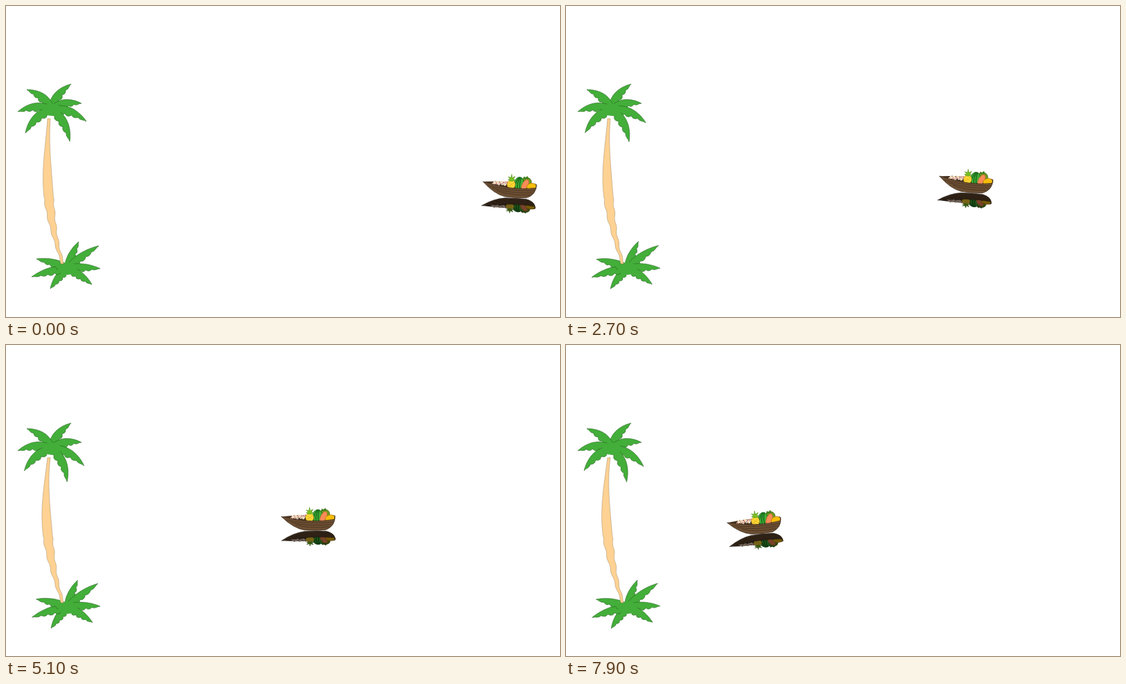
Recreate the animation shown at these times as an HTML page with a canvas. Size 800x450 px, loop 8 s.

```html
<!DOCTYPE html>
<html lang="en">
<head>
<meta charset="utf-8">
<title>Boat and palm</title>
<style>
html, body { margin: 0; width: 100%; height: 100%; overflow: hidden; background: #fff; }
canvas { display: block; }
</style>
</head>
<body>
<canvas id="stage" width="800" height="450"></canvas>
<script>
const c = document.getElementById('stage').getContext('2d');
const LOOP = 8000, STEP = 100;
const START = 0.29, SPEED = 58.6;
const GREEN = '#43ae39', EDGE = '#20591c';

// Leaf tips around each tuft's centre
const CROWN = {
  x: 66, y: 150, width: 6.6, bend: 0.2,
  tips: [[94, 113], [30, 121], [109, 141], [17, 153], [116, 167], [28, 184], [92, 196]],
  turn: (dx, dy) => dy > 9 ? 0.004 * Math.max(dx, 15) : 0
};
const BUSH = {
  x: 89, y: 380, width: 6, bend: 0.06,
  tips: [[105, 341], [134, 347], [136, 380], [124, 403], [64, 409], [37, 392], [44, 366]],
  turn: () => -0.05
};

function shape(path, fill, edge, width = 0.7) {
  const p = path instanceof Path2D ? path : new Path2D(path);
  if (fill) { c.fillStyle = fill; c.fill(p); }
  if (edge) { c.strokeStyle = edge; c.lineWidth = width; c.stroke(p); }
}

function oval(x, y, rx, ry, turn, fill, edge) {
  const p = new Path2D();
  p.ellipse(x, y, rx, ry, turn, 0, 2 * Math.PI);
  shape(p, fill, edge);
}

function outline(left, right) {
  const p = new Path2D();
  [...left, ...right.reverse()].forEach(([x, y]) => p.lineTo(x, y));
  p.closePath();
  return p;
}

// A leaf along the x axis: it arches to one side and its lower edge is notched
function leafPath(len, width, arch) {
  const n = 16, top = [], low = [];
  for (let i = 0; i <= n; i++) {
    const u = i / n, x = u * len, mid = 2 * arch * len * u * (1 - u);
    const half = width * Math.sin(Math.PI * (0.3 + 0.7 * u)) ** 0.85;
    const side = Math.sign(arch);
    top.push([x, mid + side * half]);
    low.push([x, mid - side * half * (i % 3 ? 1.05 : 0.65)]);
  }
  return outline(top, low);
}

function tuft({ x, y, width, bend, tips, turn }, sway) {
  for (const [tx, ty] of tips) {
    const dx = tx - x, dy = ty - y;
    c.save();
    c.translate(x, y);
    c.rotate(Math.atan2(dy, dx) + sway * turn(dx, dy));
    shape(leafPath(Math.hypot(dx, dy), width, dx > 0 ? -bend : bend), GREEN, EDGE, 0.5);
    c.restore();
  }
  oval(x, y, 14, 9, 0, GREEN);
}

function trunk(sway) {
  const top = 163, height = 210, left = [], right = [];
  for (let y = top; y <= top + height; y += 3) {
    const u = (y - top) / height;
    const ridge = u > 0.55 ? 0.8 * Math.sin(y * 0.3) : 0;
    const mid = 62 - 14 * u + 34 * u ** 2.5 - 14 * sway * u * (1 - u) ** 2 + ridge;
    const half = 2 + 4.8 * Math.sin(Math.PI * u) ** 2;
    left.push([mid - half, y]);
    right.push([mid + half, y]);
  }
  shape(outline(left, right), '#ffd293', '#8a7350', 0.4);
}

function fruit() {
  // blossoms
  for (let i = 0; i < 13; i++) {
    const x = -24 + i * 1.65, y = -8.5 - (i * 7 % 5) * 0.9;
    oval(x, y, 2, 1.6, i, i % 3 ? '#fff4e2' : '#f3c9bd');
    oval(x, y, 0.7, 0.7, 0, ['#b23a48', '#e3a62b', '#6d4a3a'][i % 3]);
  }
  // round fruit behind, melon, papaya, mango
  oval(24, -14, 7, 6.5, 0, '#6f9a1d', '#38500e');
  shape('M18 -18 L20 -22 22 -20 25 -23 26 -19 30 -19Z', '#3f7d1c');
  oval(13, -11.5, 7, 9, 0.25, '#3fae35', '#174d18');
  for (const k of [-4, -0.5, 3]) {
    shape(`M${15 + k * 0.4} -20 Q${10 + k} -12 ${12 + k} -3`, null, '#14601c', 1.2);
  }
  oval(22, -9.5, 4.2, 8.5, 0.45, '#fa8c57', '#c9663b');
  oval(31.5, -7.5, 7, 5, -0.2, '#f6bd0c', '#a87a0a');
  // pineapple
  oval(2, -9, 5.8, 6.4, 0, '#fdd835', '#c79a1d');
  shape('M-2 -12 L6 -6 M-2 -8 L4 -4 M6 -12 L-2 -6', null, '#e0ab22', 0.6);
  shape('M0 -14 L-3 -16 0 -17 -3 -20 1 -19 2 -24 3 -19 7 -21 5 -17 7 -16 4 -14Z',
    '#78bf22', '#4b8517', 0.5);
}

function hull() {
  shape('M-38 -11 Q-10 -14 20 -12 L38 -12 38 -5 0 0Z', '#4a3524');
  fruit();
  shape('M-39 -11 Q-14 -5 4 -4 T38 -6 L38.5 -11 Q39 4 25 9 Q10 10.5 -6 9 Q-22 6 -39 -11Z',
    '#6c4f33', '#38291b');
  for (const k of [0, 3.3, 6.6]) {
    shape(`M${-32 + k * 2} ${-6 + k} Q0 ${1 + k} ${37 - k} ${-2 + k}`, null, '#493420', 0.8);
  }
}

function boat(x, y, tilt) {
  c.save();
  c.translate(x, y);
  c.rotate(tilt * Math.PI / 180);
  c.save();
  c.translate(0, 16.8);
  c.scale(1, -0.65);
  c.filter = 'brightness(0.48)';
  hull();
  c.restore();
  hull();
  c.restore();
}

function draw(now) {
  const t = Math.floor(now % LOOP / STEP) * STEP / 1000;
  const run = t < START ? t * t / (2 * START) : t - START / 2;
  const sway = (1 - Math.cos(2 * Math.PI * run / 3)) / 2;

  c.clearRect(0, 0, 800, 450);
  tuft(CROWN, sway);
  tuft(BUSH, sway);
  trunk(sway);

  // The boat follows a shallow arc, leans along it and rocks
  const apex = 4.4;
  const y = 258.5 + 0.45 * (t - apex) ** 2;
  const tilt = 0.88 * (apex - t) - 0.6 + 3.2 * Math.sin(Math.PI * run);
  boat(727 - SPEED * run, y, tilt);
}

const begin = performance.now();
function tick() {
  draw(performance.now() - begin);
  requestAnimationFrame(tick);
}
tick();
</script>
</body>
</html>
```
